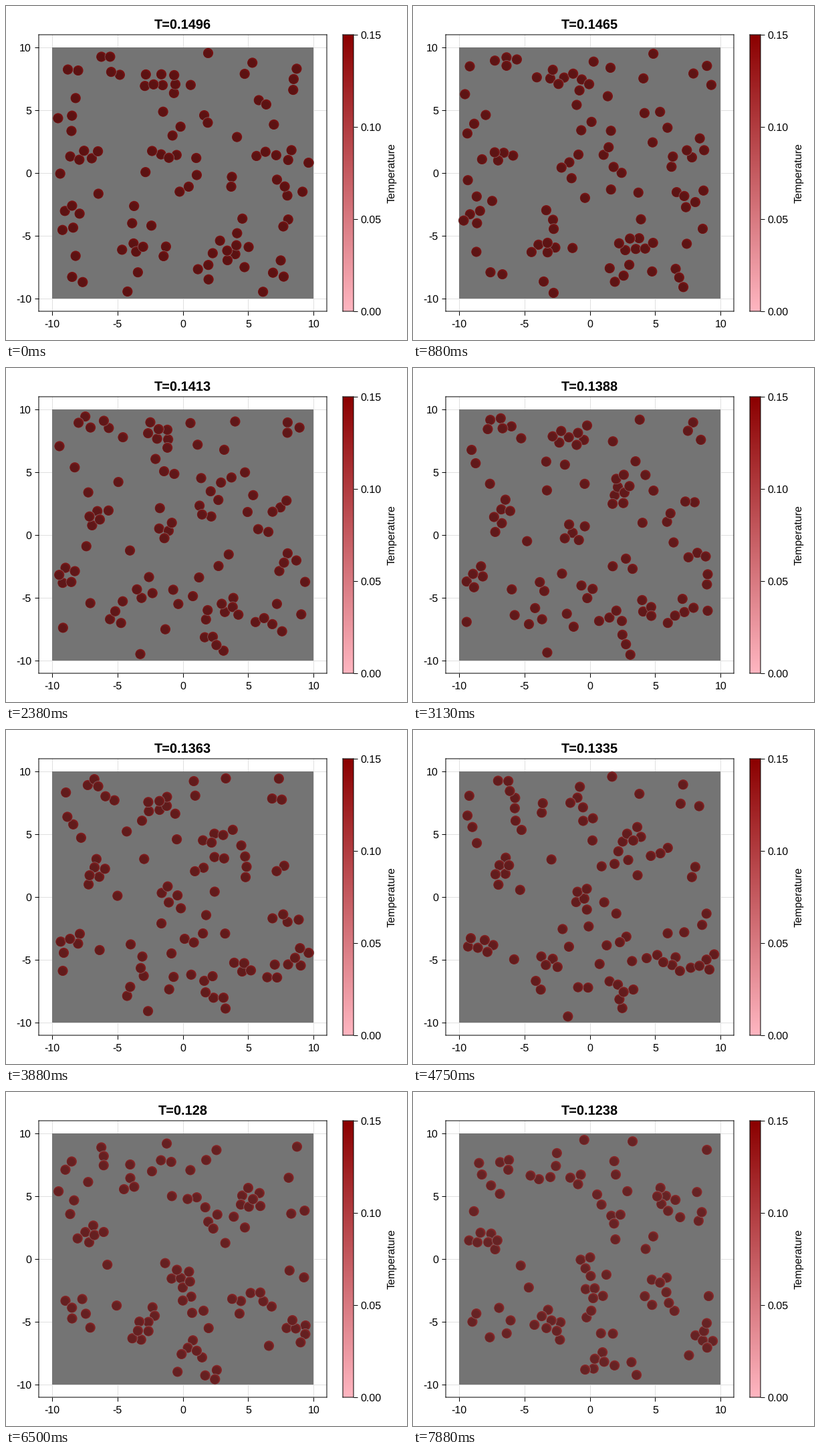
A matplotlib script that plays this animation: 600 px wide and 500 px high, repeating every 8000 ms.

```python
import numpy as np
import matplotlib.pyplot as plt
from matplotlib.animation import FuncAnimation
from matplotlib.patches import Rectangle

W, H, DPI = 600, 500, 100
FRAMES, STEP_MS = 64, 125
BALLS, WALL, WARMUP = 100, 9.65, 12
PX = 72 / DPI                       # one pixel in points
LIGHT = np.array([255, 182, 193]) / 255
DARK = np.array([139, 0, 0]) / 255

plt.rcParams.update({
    "font.family": "Liberation Sans",
    "font.size": 16 * PX,
    "text.hinting": "none",
    "axes.unicode_minus": False,
    "axes.linewidth": PX,
})


def temperature(i):
    return 0.14958 * np.exp(-0.003 * i)


def scatter_start(rng, gap=0.66):
    """Random points in the box, none closer than the gap."""
    pts = []
    while len(pts) < BALLS:
        p = rng.uniform(-WALL, WALL, 2)
        if all(np.hypot(*(p - q)) > gap for q in pts):
            pts.append(p)
    return np.array(pts)


def forces(p, eps=0.32, sigma=0.64):
    """Lennard-Jones forces, capped at very short range."""
    d = p[:, None] - p[None]
    r2 = np.maximum((d ** 2).sum(-1), 0.36)
    s6 = (sigma ** 2 / r2) ** 3
    return (d * (24 * eps * (2 * s6 ** 2 - s6) / r2)[..., None]).sum(1)


def simulate(substeps=25, frame_time=0.35, gamma=0.5):
    """Langevin motion in a closed box under falling temperature."""
    rng = np.random.default_rng(7)
    p = scatter_start(rng)
    v = rng.normal(0, np.sqrt(temperature(0)), p.shape)
    dt = frame_time / substeps
    keep = np.exp(-gamma * dt)
    track = []
    for i in range(-WARMUP, FRAMES):
        kick = np.sqrt(temperature(max(i, 0)) * (1 - keep ** 2))
        for _ in range(substeps):
            v = keep * (v + dt * forces(p)) + kick * rng.normal(size=p.shape)
            p = p + dt * v
            v = np.where(np.abs(p) > WALL, -np.sign(p) * np.abs(v), v)
            p = np.clip(p, -WALL, WALL)
        track.append(p)
    return track[WARMUP:]


def pixel_axes(left, top, right, bottom):
    """Axes placed by stage pixels, with soft unsnapped borders."""
    ax = fig.add_axes([left / W, 1 - bottom / H,
                       (right - left) / W, (bottom - top) / H])
    for spine in ax.spines.values():
        spine.set_snap(False)
    return ax


track = simulate()
fig = plt.figure(figsize=(W / DPI, H / DPI), dpi=DPI, facecolor="white")

ax = pixel_axes(49, 43, 480, 457)
ax.set(xlim=(-11, 11), ylim=(-11, 11),
       xticks=range(-10, 11, 5), yticks=range(-10, 11, 5))
ax.set_axisbelow(True)
ax.grid(color="#e0e0e0", lw=PX)
ax.tick_params(length=6 * PX, width=PX)
ax.tick_params(axis="x", pad=6 * PX)
ax.tick_params(axis="y", pad=5 * PX)
ax.add_patch(Rectangle((-10, -10), 20, 20, fc="#747474", lw=0, zorder=2))

bar = pixel_axes(504, 43, 520, 457)
ramp = np.linspace(0, 1, 256)[:, None, None]
bar.imshow(LIGHT + (DARK - LIGHT) * ramp, origin="lower", aspect="auto",
           extent=(0, 1, 0, 0.15), interpolation="bilinear")
bar.set(xticks=[], yticks=np.linspace(0, 0.15, 4))
bar.yaxis.set_major_formatter("{x:.2f}")
bar.yaxis.tick_right()
bar.tick_params(length=6 * PX, width=PX, pad=4 * PX)
fig.text(577 / W, 0.5, "Temperature", rotation=90, ha="center", va="center")
title = fig.text(264.5 / W, 1 - 35 / H, "", ha="center", va="baseline",
                 fontsize=20 * PX, weight="bold")

# Each ball: faint halo, lit rim, then two darker discs off to one side.
DIAMETER = np.array([16.4, 15.2, 13.8, 11.8])
SHIFT = np.array([0, 0, -0.4, -0.8])[:, None] / [19.59, 18.82]
GAIN = np.array([0, 0.76, 0.64, 0.53])[:, None]
BASE = np.array([0.47, 0.07, 0.07, 0.07])[:, None]
balls = ax.scatter(*np.zeros((2, 4 * BALLS)), lw=0, zorder=3,
                   s=np.tile((DIAMETER * PX) ** 2, BALLS))


def draw(i):
    t = temperature(i)
    tint = LIGHT + (DARK - LIGHT) * t / 0.15
    balls.set_offsets((track[i][:, None] + SHIFT).reshape(-1, 2))
    balls.set_facecolor(np.tile(GAIN * tint + BASE, (BALLS, 1)))
    title.set_text(f"T={round(float(t), 4)}")
    return balls, title


anim = FuncAnimation(fig, draw, frames=FRAMES, interval=STEP_MS,
                     repeat=True, repeat_delay=0, blit=False)
plt.show()
```
